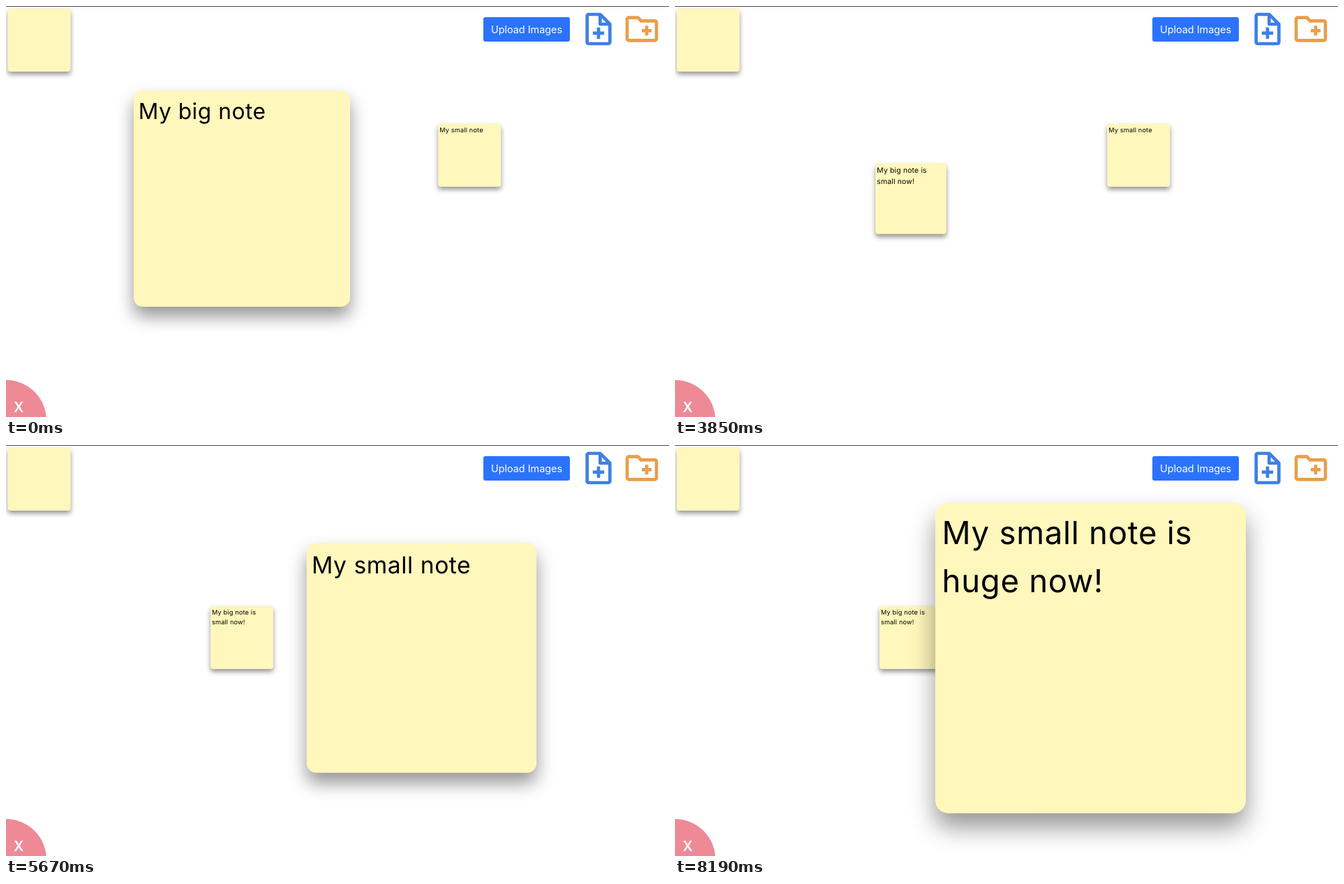
An HTML page for the animation above (9030 ms loop, 950x589 px).

```html
<!DOCTYPE html>
<html lang="en">
<head>
<meta charset="utf-8">
<title>Sticky notes</title>
<style>
  html, body { margin: 0; width: 100%; height: 100%; overflow: hidden; }
  body { position: relative; background: #fff; font-family: Inter, sans-serif; }
  body > * { position: absolute; box-sizing: border-box; }
  .edge { left: 0; top: 0; width: 100%; height: 1px; background: #4c4c4c; }
  .note {
    left: -45px; top: -45px; width: 90px; height: 90px;
    padding: 3.1px 1.95px; border-radius: 3.7px;
    background: #fff7bc; box-shadow: 0 4px 7px rgba(0, 0, 0, .42);
    color: #000; font-size: 9.2px; line-height: 14px; letter-spacing: .155px;
    white-space: pre-wrap; text-rendering: geometricPrecision;
  }
  .caret { position: relative; visibility: hidden; }
  .caret::after {
    content: ""; position: absolute; left: -.75px; top: -1px;
    width: .65px; height: 11.1px; background: #000;
  }
  .upload {
    left: 684px; top: 16px; width: 124px; height: 35px; border-radius: 3px;
    background: #2b73ff; color: #fff; font-size: 14.4px; line-height: 35px;
    text-align: center; white-space: nowrap;
  }
  svg { top: 4.7px; width: 56px; height: 56px; }
  .trash {
    left: -58px; top: 536px; width: 116px; height: 116px; border-radius: 50%;
    background: #ee8a95; color: #fff; font-size: 20px; font-weight: 600;
    line-height: 24px; padding: 26.5px 0 0 69px;
  }
</style>
</head>
<body>
<div class="edge"></div>
<div class="upload">Upload Images</div>
<svg viewBox="0 0 24 24" style="left:820.7px" fill="#3e80e4">
  <path fill-rule="evenodd" d="M19.7 8.3l-6-6A1 1 0 0 0 13 2H6a2 2 0 0 0-2 2v16a2 2 0 0 0 2 2h12a2 2 0 0 0 2-2V9a1 1 0 0 0-.3-.7zM16.6 8H14V5.4zM6 20V4h6v5a1 1 0 0 0 1 1h5v10zM13 11h-2v2.5H8.5v2H11V18h2v-2.5h2.5v-2H13z"/>
</svg>
<svg viewBox="0 0 24 24" style="left:883.3px" fill="#e99e4b">
  <path d="M20 6h-8l-2-2H4a2 2 0 0 0-2 2v12a2 2 0 0 0 2 2h16a2 2 0 0 0 2-2V8a2 2 0 0 0-2-2zm0 12H4V6h5.17l2 2H20zm-8-4h2v2h2v-2h2v-2h-2v-2h-2v2h-2z"/>
</svg>
<div class="trash">X</div>
<script>
const LOOP = 9030, STEP = 70;

const progress = (t, from, to) => Math.min(1, Math.max(0, (t - from) / (to - from)));
const smooth = u => u * u * (3 - 2 * u);
const smoother = u => u * u * u * (u * (6 * u - 15) + 10);
const mix = (a, b, u) => a + (b - a) * u;
const zoom = (a, b, u) => a * (b / a) ** u;

function createNote() {
  const el = document.createElement("div");
  const text = document.createTextNode("");
  const caret = document.createElement("span");
  el.className = "note";
  caret.className = "caret";
  el.append(text, caret);
  document.body.append(el);
  return {
    place(x, y, scale = 1, angle = 0) {
      el.style.transform = `translate(${x}px, ${y}px) rotate(${angle}deg) scale(${scale})`;
    },
    // Shows the text plus every character whose key time has passed.
    type(t, start, added, keys, focus, blur) {
      text.data = start + added.slice(0, keys.filter(k => k <= t).length);
      caret.style.visibility = t >= focus && t < blur ? "visible" : "hidden";
    }
  };
}

const [spare, first, second] = Array.from({ length: 3 }, createNote);
spare.place(47.5, 49);

const firstKeys = [1190, 1400, 1470, 1610, 1820, 1890, 2030, 2100, 2240, 2310, 2450, 2520, 2590, 2870];
const secondKeys = [6370, 6440, 6580, 6650, 6790, 6930, 7000, 7140, 7280, 7350, 7490, 7560, 7700];

function draw(now) {
  const t = Math.floor(now % LOOP / STEP) * STEP;

  first.place(338, 276, zoom(3.444, 1, smooth(progress(t, 3310, 3980))));
  first.type(t, "My big note", " is small now!", firstKeys, 840, 3010);

  const x = mix(664.3, 595.5, smoother(progress(t, 4715, 5460)));
  const y = mix(214, 305.2, smoother(progress(t, 4675, 5460)));
  const tilt = -1.1 * Math.sin(Math.PI * progress(t, 4690, 5460));
  second.place(x, y, zoom(1, 4.945, smooth(progress(t, 5150, 5870))), tilt);
  second.type(t, "My small note", " is huge now!", secondKeys, 6090, 8190);

  requestAnimationFrame(draw);
}
requestAnimationFrame(draw);
</script>
</body>
</html>
```
